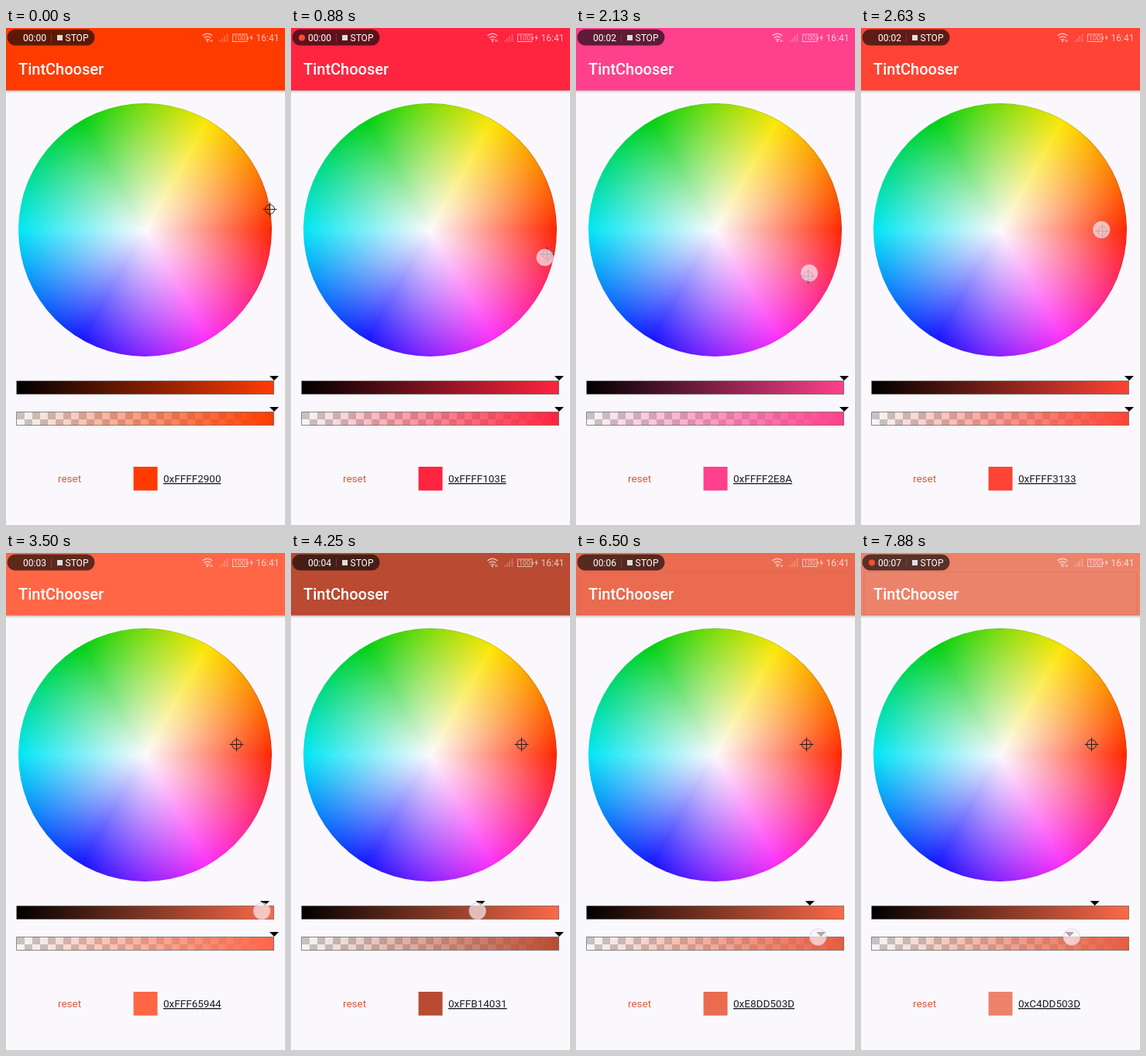
An HTML page that plays this animation: 360 by 640 pixels, repeating every 8000 ms.

```html
<!DOCTYPE html>
<html lang="en">
<head>
<meta charset="utf-8">
<title>Tint chooser</title>
<style>
html, body { margin: 0; width: 100%; height: 100%; overflow: hidden; background: #faf8fc; }
#wheel {
  position: absolute; left: 16.3px; top: 96.8px; width: 326.6px; height: 326.6px; border-radius: 50%;
  background:
    radial-gradient(closest-side, #fcfafc, rgba(255,255,255,0)),
    conic-gradient(from 90deg, #ff2600, #fd30f8, #1414ff, #00e6f5, #00d012, #fce600, #ff2600);
  box-shadow: inset -.7px .4px 0 rgba(90,70,110,.4);
}
svg { position: absolute; left: 0; top: 0; width: 360px; height: 640px; }
text { font-family: Roboto, "Open Sans", sans-serif; font-size: 12px; fill: #fff; white-space: pre; }
text.body { font-size: 13.5px; }
</style>
</head>
<body>
<div id="wheel"></div>
<svg viewBox="0 0 360 640">
  <defs>
    <linearGradient id="shadow" x2="0" y2="1">
      <stop stop-color="#000" stop-opacity=".22"/>
      <stop offset="1" stop-color="#000" stop-opacity="0"/>
    </linearGradient>
    <linearGradient id="valueFill">
      <stop stop-color="#000"/>
      <stop id="valueEnd" offset="1"/>
    </linearGradient>
    <linearGradient id="alphaFill">
      <stop id="alphaStart" stop-opacity="0"/>
      <stop id="alphaEnd" offset="1"/>
    </linearGradient>
    <pattern id="checks" x="14" y="494" width="20" height="20" patternUnits="userSpaceOnUse">
      <path d="M0 0h20v20H0z" fill="#f6f6f6"/>
      <path d="M0 0h10v10H0zM10 10h10v10H10z" fill="#c4c4c4"/>
    </pattern>
  </defs>

  <rect y="80" width="360" height="4" fill="url(#shadow)"/>
  <rect id="header" width="360" height="80.4"/>
  <rect id="seam" x="4" y="24.5" width="352" height="55" fill="none" stroke="#000"/>
  <text x="16" y="59.5" style="font-size:20px;font-weight:500">TintChooser</text>

  <rect x="1.5" y="1.8" width="113" height="20.6" rx="10.3" fill="#0c0808" fill-opacity=".66"/>
  <circle id="dot" cx="14" cy="12.5" r="4" fill="#ff4a2e"/>
  <text id="timer" x="22" y="16.7"></text>
  <path d="M58.5 7v11" stroke="#fff" stroke-opacity=".15"/>
  <rect x="66" y="9" width="7" height="7" fill="#ddd"/>
  <text x="76.5" y="16.7">STOP</text>

  <g opacity=".62" fill="none" stroke="#fff" stroke-width="1.4">
    <path d="M253.5 10q6.5-5.5 13 0M255.5 12.8q4.5-3.6 9 0M257.5 15.3q2.5-1.8 5 0"/>
    <circle cx="260" cy="17" r=".6"/>
    <path d="M264 15v3M266 15v3" stroke-width="1"/>
    <path d="M275 18h2v-2h-2zM278 18h2v-5h-2zM281 18h2v-8h-2zM284.5 18h2V7h-2z"
      fill="#fff" stroke="none" opacity=".35"/>
    <rect x="292.5" y="8" width="18.5" height="9.5" stroke-width="1"/>
    <path d="M312 11v4" stroke-width="1.5"/>
    <path d="M317.5 8l-3 5h2l-1 4 3.5-5h-2z" fill="#fff" stroke="none"/>
    <text x="294" y="16" stroke="none" style="font-size:9px">100</text>
  </g>
  <text x="322.5" y="16.7" opacity=".7">16:41</text>

  <g id="cross" fill="none" stroke="#262020" stroke-width="1">
    <circle r="6"/>
    <path d="M-9 0H9M0-9V9"/>
  </g>

  <rect x="14" y="454" width="332" height="18" fill="url(#valueFill)"/>
  <rect x="14" y="494" width="332" height="18" fill="url(#checks)"/>
  <rect x="14" y="494" width="332" height="18" fill="url(#alphaFill)"/>
  <path d="M13.5 454.5h332v17h-332zM13.5 494.5h332v17h-332z" fill="none" stroke="#777" stroke-opacity=".85"/>
  <path id="valueMark" d="M-6 0H6L0 6z"/>
  <path id="alphaMark" d="M-6 0H6L0 6z"/>

  <text class="body" x="67" y="585" style="fill:#dc5a40">reset</text>
  <rect id="swatch" x="164.5" y="565" width="31" height="30.6"/>
  <text id="hex" class="body" x="203" y="585" style="fill:#1c1c1c;text-decoration:underline"></text>

  <circle id="touch" r="10.5" fill="#fcf2f8" fill-opacity=".68" stroke="#dcd2e2" stroke-opacity=".6" stroke-width="1.5"/>
</svg>
<script>
const LOOP = 8000, STEP = 125, LEAD = 33;
const CX = 179.8, CY = 260, R = 163, BAR_X = 14, BAR_W = 332;
const $ = id => document.getElementById(id);

// Keys are [time, value...], joined by straight runs.
const wheelKeys = [[500, 9.647, 1], [1500, -47.04, .8353], [1625, -52, .83], [2625, -.58, .8078], [3000, 6.94, .722]];
const valueKeys = [[3400, 1], [4250, 177 / 255], [4650, .555], [4800, .56], [5500, 218 / 255], [5625, 221 / 255]];
const alphaKeys = [[6100, 1], [6500, 232 / 255], [7200, .665], [7375, .66], [7875, 196 / 255], [8000, .8]];

function track(keys, t) {
  if (t <= keys[0][0]) return keys[0].slice(1);
  for (let i = 1; i < keys.length; i++) {
    const a = keys[i - 1], b = keys[i];
    if (t <= b[0]) {
      const k = (t - a[0]) / (b[0] - a[0]);
      return a.slice(1).map((v, j) => v + (b[j + 1] - v) * k);
    }
  }
  return keys[keys.length - 1].slice(1);
}

function hsv(h, s, v) {
  return [5, 3, 1].map(n => {
    const k = (n + h / 60 + 6) % 6;
    return 255 * v * (1 - s * Math.max(0, Math.min(k, 4 - k, 1)));
  });
}

// Screen tone: slightly lifted, blended over white.
function tone([r, g, b], a = 1) {
  const lifted = [r * 1.05, g + Math.max(0, r - g) * .085, b * 1.02].map(c => Math.min(255, c));
  return `rgb(${lifted.map(c => Math.round(c * a + 255 * (1 - a)))})`;
}

const hex2 = n => Math.round(n).toString(16).toUpperCase().padStart(2, "0");
const move = (id, x, y) => $(id).setAttribute("transform", `translate(${x.toFixed(2)} ${y.toFixed(2)})`);
const barX = v => BAR_X + BAR_W * v;
const snap = n => Math.round(n) + .5;

function wheelPoint(t) {
  const [h, s] = track(wheelKeys, t), a = h * Math.PI / 180;
  return [CX + R * s * Math.cos(a), CY - R * s * Math.sin(a)];
}

// The finger runs slightly ahead of the controls it drags.
function touchPoint(t) {
  const ahead = t + LEAD;
  if (t >= 125 && t < 3000) return wheelPoint(ahead);
  if (t >= 3375 && t < 5700) return [barX(track(valueKeys, ahead)[0]), t < 4800 ? 461 : 458];
  if (t >= 6000) return [barX(track(alphaKeys, ahead)[0]), 494.5];
  return null;
}

function draw(time) {
  const t = Math.floor(time / STEP) * STEP;
  const [h, s] = track(wheelKeys, t);
  const [v] = track(valueKeys, t), [a] = track(alphaKeys, t);
  const color = hsv(h, s, v), solid = tone(color), mixed = tone(color, a);

  $("header").setAttribute("fill", mixed);
  $("swatch").setAttribute("fill", mixed);
  $("seam").setAttribute("stroke-opacity", (1 - a) * .3);
  $("valueEnd").setAttribute("stop-color", tone(hsv(h, s, 1)));
  $("alphaStart").setAttribute("stop-color", solid);
  $("alphaEnd").setAttribute("stop-color", solid);
  $("hex").textContent = "0x" + [a * 255, ...color].map(hex2).join("");
  $("timer").textContent = "00:0" + Math.floor(t / 1000);
  $("dot").style.opacity = t % 1000 >= 700 ? 1 : 0;

  move("cross", ...wheelPoint(t).map(snap));
  move("valueMark", barX(v), 448);
  move("alphaMark", barX(a), 488);

  const p = touchPoint(t);
  $("touch").style.display = p ? "" : "none";
  if (p) move("touch", ...p);
}

const start = performance.now();
function tick() {
  draw((performance.now() - start) % LOOP);
  requestAnimationFrame(tick);
}
tick();
</script>
</body>
</html>
```
